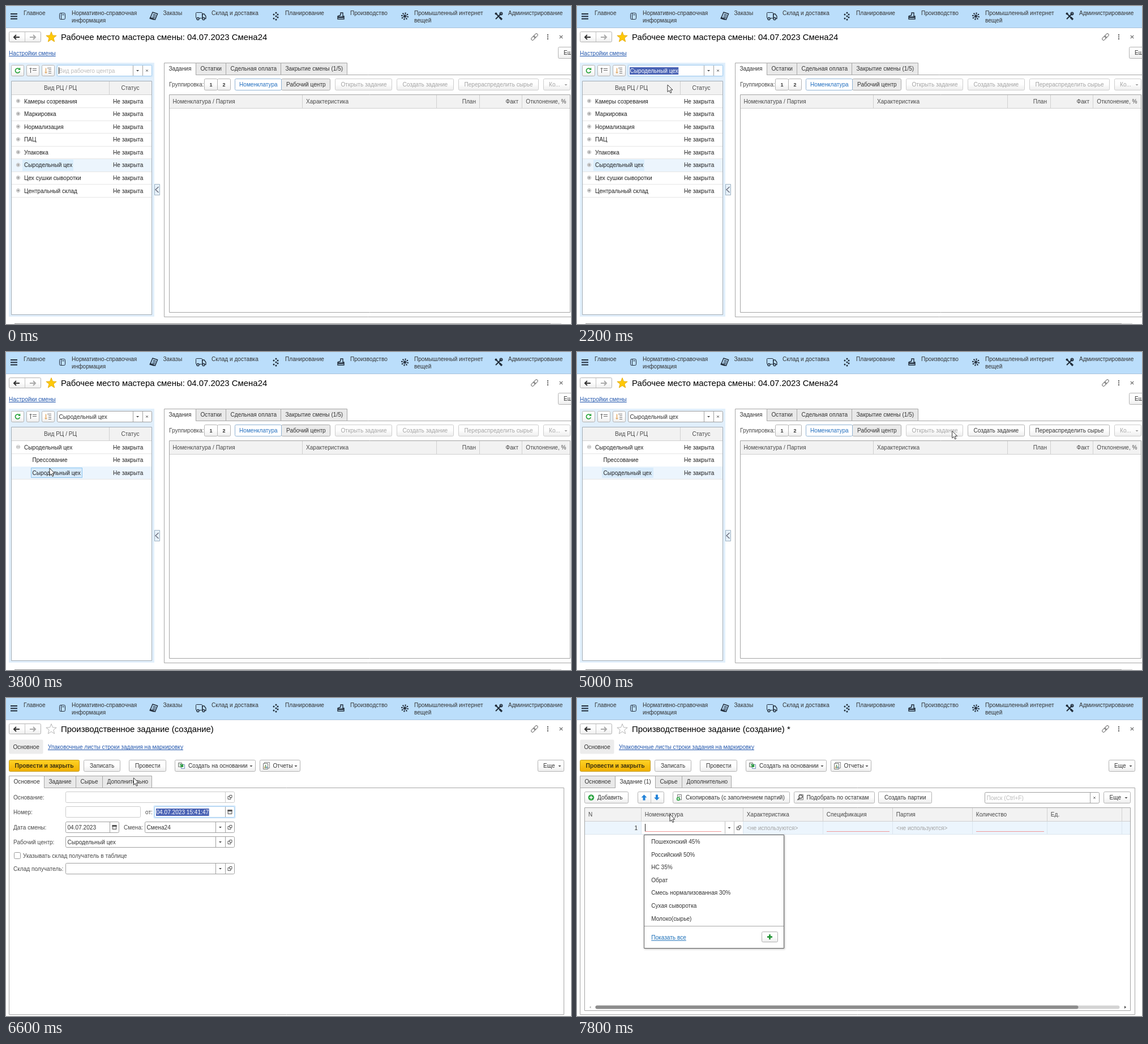
An HTML page with a canvas for the animation above (8 s loop, 998 by 561 pixels).

```html
<!DOCTYPE html>
<html lang="ru">
<head>
<meta charset="utf-8">
<title>Рабочее место</title>
<style>
html, body { margin: 0; width: 100%; height: 100%; overflow: hidden; background: #fff; }
canvas { display: block; }
</style>
</head>
<body>
<canvas id="stage" width="998" height="561"></canvas>
<script>
const c = document.getElementById('stage').getContext('2d');
const LOOP = 8000, STEP = 200, ROW = 22.57, SIZE = 10.1;
const INK = '#333', GREY = '#a3a3a3', EDGE = '#a6a6a6', LINK = '#2458ae', PALE = '#ecf5fd';

// Drawing helpers; text is placed by its vertical centre
function text(s, x, y, color = INK, o = {}) {
  const size = o.size || SIZE;
  c.font = `${o.bold ? 'bold ' : ''}${size}px "Liberation Sans", Arial, sans-serif`;
  c.textAlign = o.align || 'left';
  c.fillStyle = color;
  c.fillText(s, x, y + size * 0.36);
  return c.measureText(s).width;
}
function link(s, x, y, color = LINK) {
  rect(x, y + 5, text(s, x, y, color), 1, color);
}
function rect(x, y, w, h, fill) {
  c.fillStyle = fill;
  c.fillRect(x, y, w, h);
}
function box(x, y, x2, y2, fill, edge = EDGE, r = 0) {
  c.beginPath();
  c.roundRect(x + 0.5, y + 0.5, x2 - x - 1, y2 - y - 1, r);
  if (fill) { c.fillStyle = fill; c.fill(); }
  if (edge) { c.strokeStyle = edge; c.lineWidth = 1; c.stroke(); }
}
const vline = (x, y, y2, color = EDGE) => rect(x, y, 1, y2 - y, color);
const hline = (x, y, x2, color = EDGE) => rect(x, y, x2 - x, 1, color);
function path(points, o = {}) {
  c.beginPath();
  for (let i = 0; i < points.length; i += 2) c.lineTo(points[i], points[i + 1]);
  if (o.close || o.fill) c.closePath();
  if (o.fill) { c.fillStyle = o.fill; c.fill(); }
  if (o.line) { c.strokeStyle = o.line; c.lineWidth = o.w || 1; c.stroke(); }
}
function disc(x, y, r, fill, line, w = 1) {
  c.beginPath();
  c.arc(x, y, r, 0, 7);
  if (fill) { c.fillStyle = fill; c.fill(); }
  if (line) { c.strokeStyle = line; c.lineWidth = w; c.stroke(); }
}
function at(x, y, turn, draw) {
  c.save();
  c.translate(x, y);
  c.rotate(turn);
  draw();
  c.restore();
}
function plus(x, y, r, w, color) {
  rect(x - r, y - w / 2, r * 2, w, color);
  rect(x - w / 2, y - r, w, r * 2, color);
}
function cross(x, y, r, color, w = 1.2) {
  path([x - r, y - r, x + r, y + r], { line: color, w });
  path([x + r, y - r, x - r, y + r], { line: color, w });
}
const drop = (x, y, color = '#444') => path([x - 2.5, y - 1, x + 2.5, y - 1, x, y + 1.6], { fill: color });

// Interface parts
function face(x, y, x2, y2, edge = '#b3b3b3') {
  const g = c.createLinearGradient(0, y, 0, y2);
  g.addColorStop(0, '#fff');
  g.addColorStop(0.5, '#fdfdfd');
  g.addColorStop(1, '#ececec');
  box(x, y, x2, y2, g, edge, 2);
}
function button(x, y, x2, label, lx, color = INK, edge) {
  face(x, y, x2, y + 21, edge);
  text(label, lx, y + 10.5, color);
}
function arrow(x, y, turn, color, len = 5, head = 4, w = 2) {
  at(x, y, turn, () => {
    path([-len, 0, len - 1, 0], { line: color, w });
    path([len - head, -head, len, 0, len - head, head], { line: color, w });
  });
}
function tabs(list, y, y2, active) {
  list.forEach(([label, x, x2], i) => {
    const on = i === active;
    box(x, y, x2 + 1, y2 + 1, on ? '#fff' : '#e9e9e9', EDGE);
    if (on) rect(x + 1, y2, x2 - x - 1, 2, '#fff');
    text(label, x + 8.5, (y + y2) / 2);
  });
}
function openIcon(x, y) {
  box(x - 4, y - 2, x + 2, y + 4, null, '#555');
  box(x - 1, y - 4, x + 4, y + 1, '#fff', '#555');
}
function calendar(x, y) {
  box(x - 4, y - 4, x + 4, y + 4, '#fff', '#555');
  rect(x - 4, y - 4, 8, 3, '#555');
  for (let i = 0; i < 4; i++) rect(x - 2 + (i % 2) * 3, y + (i >> 1) * 2 - 0.5, 1, 1, '#555');
}
function field(x, y, x2, value, o = {}) {
  if (o.focus) box(x - 2, y - 2, x2 + 2, y + 22, '#d3e8fa', null, 2);
  box(x, y, x2, y + 20, '#fff', o.focus ? '#a3cdf0' : o.pale ? '#cbcbcb' : '#a0a0a0', 2);
  const marks = o.marks || '';
  [...marks].forEach((m, i) => {
    const left = x2 - 17 * (marks.length - i), mid = left + 8.5;
    vline(left, y + 1, y + 19, o.pale ? '#cbcbcb' : '#a0a0a0');
    if (m === 'v') drop(mid, y + 10);
    if (m === 'o') openIcon(mid, y + 10);
    if (m === 'c') calendar(mid, y + 10);
    if (m === 'x') cross(mid - 0.5, y + 10, 1.8, '#666', 1);
  });
  if (o.selected) {
    c.font = `${SIZE}px "Liberation Sans", Arial, sans-serif`;
    rect(x + 3, y + 4, c.measureText(value).width + 1, 13, '#4a63b5');
  }
  text(value, x + 3.5, y + 10.3, o.selected ? '#fff' : o.hint ? '#bcbcbc' : INK);
  if (o.caret) vline(x + 3, y + 4, y + 16, '#222');
}
function popup(x, y, items) {
  c.save();
  c.shadowColor = 'rgba(0,0,0,.3)';
  c.shadowBlur = 3;
  c.shadowOffsetX = c.shadowOffsetY = 1;
  rect(x, y, 248, 201, '#fff');
  c.restore();
  box(x, y, x + 248, y + 201, '#fff', '#606060');
  items.forEach((s, i) => text(s, x + 13.2, y + 12.5 + i * ROW));
  hline(x + 1, y + 161, x + 247, '#a8a8a8');
  link('Показать все', x + 13.2, y + 181.3, '#1b6fb8');
  face(x + 208, y + 171, x + 237, y + 190);
  plus(x + 222.5, y + 180.5, 4.5, 2.6, '#1d9130');
}
function star(x, y, filled) {
  const p = [];
  for (let i = 0; i < 10; i++) {
    const a = i * Math.PI / 5 - Math.PI / 2, r = i % 2 ? 4.1 : 9.6;
    p.push(x + r * Math.cos(a), y + 0.7 + r * Math.sin(a));
  }
  path(p, filled ? { fill: '#ffc907', line: '#e5ae12' } : { close: 1, line: '#b5b5b5' });
}

function menuIcons() {
  const d = '#222d3a';
  for (let i = 0; i < 3; i++) rect(8, 13 + i * 4.3, 12, 2, d);
  box(94, 12, 105, 24, null, d, 2);
  vline(97, 12, 24, d);
  rect(99, 15, 4, 1, d);
  at(261, 18, 0.3, () => {
    path([-4, -6, 5, -6, 4, 5, -5, 5], { close: 1, line: d, w: 1.5 });
    for (let i = 0; i < 3; i++) rect(-2, -3.5 + i * 2.5, 5, 1.2, d);
    rect(-6, 3.5, 8, 3, d);
  });
  box(335, 11, 347, 22, null, d, 1);
  path([347, 14, 350, 14, 353, 18, 353, 22, 347, 22], { close: 1, line: d, w: 1.3 });
  for (const x of [339, 349]) disc(x, 22.5, 2, '#bbdefb', d, 1.4);
  [[473, 15], [477, 12], [477, 18], [473, 22], [480, 15], [480, 20], [477, 24]].forEach(([x, y]) => disc(x, y, 1.5, d));
  path([586, 23, 586, 18, 591, 16, 591, 12, 595, 12, 595, 18, 597, 18, 597, 23], { close: 1, line: d, w: 1.4 });
  rect(586, 18.5, 11, 2.5, d);
  for (let i = 0; i < 8; i++) {
    const a = i * Math.PI / 4 + 0.2, x = 704.5 + 5.5 * Math.cos(a), y = 18 + 5.5 * Math.sin(a);
    path([704.5, 18, x, y], { line: d });
    disc(x, y, 1.2, d);
  }
  disc(704.5, 18, 2, d);
  cross(870, 18, 5, d, 2);
  disc(865.5, 13.5, 2, d);
  disc(874.5, 13.5, 2.2, null, d, 1.6);
  path([872, 20, 876, 24], { line: d, w: 3.2 });
}
function chrome(title, starred) {
  rect(0, 0, 998, 561, '#fff');
  rect(0, 0, 998, 38, '#bbdefb');
  hline(0, 38, 998, '#a9c3da');
  menuIcons();
  [['Главное', 31], ['Нормативно-справочная', 116, 'информация'], ['Заказы', 277.5],
   ['Склад и доставка', 363], ['Планирование', 493], ['Производство', 608],
   ['Промышленный интернет', 721, 'вещей'], ['Администрирование', 887]].forEach(([s, x, s2]) => {
    text(s, x, 12.5);
    if (s2) text(s2, x, 25);
  });
  face(5, 45, 62, 64);
  vline(33, 46, 63, '#c4c4c4');
  arrow(19, 55, Math.PI, '#333');
  arrow(47, 55, 0, '#aaa');
  star(80, 54.5, starred);
  text(title, 97, 55, '#000', { size: 14.93 });
  for (const k of [-1, 1]) at(933.5 + k * 2.2, 54.5 - k * 2.2, -Math.PI / 4, () => box(-4.5, -2.8, 4.5, 2.8, null, '#666', 2));
  for (let i = 0; i < 3; i++) rect(956, 50 + i * 3.5, 2, 2, '#555');
  cross(980.5, 54.5, 2.7, '#666');
}

const CENTRES = ['Камеры созревания', 'Маркировка', 'Нормализация', 'ПАЦ', 'Упаковка', 'Сыродельный цех', 'Цех сушки сыворотки', 'Центральный склад'];
const SHOP = CENTRES[5];

function treeTools() {
  for (const x of [9, 36, 63]) face(x, 104, x + 23, 124);
  c.beginPath();
  c.arc(20.5, 114, 4, 0.3, 5.3);
  c.strokeStyle = '#27a33a';
  c.lineWidth = 1.7;
  c.stroke();
  path([21, 112.5, 25.5, 113, 25, 108.5], { fill: '#27a33a' });
  arrow(43.5, 113.5, -Math.PI / 2, '#555', 4.5, 2, 1);
  arrow(70.5, 114, Math.PI / 2, '#d98a29', 4.5, 2, 1);
  for (let i = 0; i < 2; i++) rect(47, 110 + i * 3, 7, 1, '#666');
  for (let i = 0; i < 4; i++) rect(i ? 75 : 73, 109 + i * 3, i ? 5 : 7, 1, '#777');
}
function tree(t) {
  const filtered = t >= 2400, open = t >= 3200, child = t >= 3600;
  const rows = !filtered ? CENTRES : open ? [SHOP, 'Прессование', SHOP] : [SHOP];
  const chosen = !filtered ? 5 : child ? 2 : 0;
  rect(5, 100, 257, 448, '#e1effb');
  treeTools();
  const filled = t >= 2200;
  field(90, 104, 258, filled ? SHOP : 'Вид рабочего центра',
    { marks: 'vx', hint: !filled, caret: !filled, selected: filled && t < 3000, focus: t < 3000 });

  box(9, 132, 258, 545, '#fff', '#a3adb6');
  rect(10, 133, 247, 24, '#f2f2f2');
  vline(182, 133, 157, '#d0d0d0');
  hline(10, 156, 257, '#d0d0d0');
  text('Вид РЦ / РЦ', 96, 144, '#4a4a4a', { align: 'center' });
  text('Статус', 219.5, 144, '#4a4a4a', { align: 'center' });
  rows.forEach((name, i) => {
    const y = 168 + i * ROW, top = Math.round(y - 11), inner = open && i > 0;
    if (i === chosen) {
      rect(10, top, 247, 22, PALE);
      if (inner) box(44, top + 2, 135, top + 20, '#d8ebfb', t < 4200 ? '#8cc6f0' : '#d8ebfb');
      else rect(29, top + 1, 90, 20, '#d9edfc');
    }
    hline(10, top + 22, 257, '#e6e6e6');
    if (!inner) {
      disc(21.5, y - 0.5, 3, '#fff', '#aaa');
      rect(19.5, y - 1, 4, 1, '#777');
      if (!open) rect(21, y - 2.5, 1, 4, '#777');
    }
    text(name, inner ? 46.5 : 32, y, '#222');
    text('Не закрыта', 189, y, '#222');
  });
  path([262.5, 314.5, 271.5, 314.5, 271.5, 333.5, 262.5, 333.5], { fill: '#e6f1fa', line: '#9fb2c2' });
  path([269.5, 319, 264, 324, 269.5, 329], { line: '#667', w: 1.3 });
}

function workplace(t) {
  chrome('Рабочее место мастера смены: 04.07.2023 Смена24', true);
  link('Настройки смены', 5, 83);
  button(975, 72, 1020, 'Еще', 985);
  tree(t);
  box(279, 121, 1000, 549, '#fff');
  tabs([['Задания', 279, 335], ['Остатки', 335, 388], ['Сдельная оплата', 388, 485], ['Закрытие смены (1/5)', 485, 602]], 100, 121, 0);
  text('Группировка:', 288, 138.5, '#4a4a4a');
  for (const [s, x] of [['1', 350], ['2', 373]]) {
    face(x, 128, x + 24, 149);
    text(s, x + 12, 138.5, INK, { bold: 1, size: 9, align: 'center' });
  }
  box(486, 128, 573, 149, '#ebebeb', '#a9a9a9', 2);
  box(404, 128, 487, 149, '#fff', '#8fb2d3', 2);
  text('Номенклатура', 412, 138.5, '#2470c0');
  text('Рабочий центр', 495, 138.5);
  const live = t >= 4200 ? INK : GREY, edge = t >= 4200 ? '#b3b3b3' : '#cdcdcd';
  button(581, 128, 682, 'Открыть задание', 591.5, GREY, '#cdcdcd');
  button(690, 128, 791, 'Создать задание', 700.5, live, edge);
  button(799, 128, 941, 'Перераспределить сырье', 809.5, live, edge);
  button(949, 128, 997, 'Ко...', 959, GREY, '#cdcdcd');
  drop(989, 139, '#999');

  box(288, 156, 997, 541, '#fff', '#a3a3a3');
  rect(289, 157, 707, 23, '#f2f2f2');
  hline(289, 180, 996, '#d0d0d0');
  for (const x of [523, 760, 836, 911]) vline(x, 157, 180, '#d0d0d0');
  text('Номенклатура / Партия', 294.5, 168, '#4a4a4a');
  text('Характеристика', 530, 168, '#4a4a4a');
  for (const [s, x] of [['План', 830], ['Факт', 905], ['Отклонение, %', 989.5]]) text(s, x, 168, '#4a4a4a', { align: 'right' });
  hline(15, 560, 981, '#8c8c8c');
  hline(962, 560, 981, '#c9c9c9');
  if (t >= 1600 && t < 2200) popup(95, 126, [SHOP, 'Нормализация', CENTRES[6], 'ПАЦ', CENTRES[0], 'Упаковка', 'Маркировка']);
}

function mainTab(t) {
  [['Основание:', 175], ['Номер:', 201.5], ['Дата смены:', 228], ['Рабочий центр:', 254.5], ['Склад получатель:', 301]]
    .forEach(([s, y]) => text(s, 13, y, '#4a4a4a'));
  field(105, 165, 404, '', { marks: 'o', pale: 1 });
  field(105, 191, 238, '', { pale: 1 });
  text('от:', 246, 201.5, '#4a4a4a');
  field(262, 191, 404, '04.07.2023 15:41:47', { marks: 'c', focus: t >= 5600, selected: t >= 5600 });
  field(105, 218, 200, '04.07.2023', { marks: 'c' });
  text('Смена:', 208, 228, '#4a4a4a');
  field(245, 218, 404, 'Смена24', { marks: 'vo' });
  field(105, 244, 404, SHOP, { marks: 'vo' });
  box(14, 272, 26, 284, '#fff', '#999', 2);
  text('Указывать склад получатель в таблице', 30, 278, '#4a4a4a');
  field(105, 291, 404, '', { marks: 'vo' });
}

function sheet(x, y) {
  box(x - 4, y - 5, x + 4, y + 5, '#fff', '#777');
  rect(x - 2, y - 2, 4, 1, '#888');
}
function taskTab(t) {
  const added = t >= 7400;
  button(13, 165, 91, 'Добавить', 36);
  disc(25, 175.5, 5.3, '#2fa544');
  plus(25, 175.5, 3, 1.6, '#fff');
  face(107, 165, 154, 186);
  vline(130, 166, 185, '#c4c4c4');
  const tint = added ? '#2483d8' : '#b4b4b4';
  for (const [x, turn] of [[118.5, 0], [141, Math.PI]])
    at(x, 175.5, turn, () => path([0, -5, 5, 0, 2, 0, 2, 5, -2, 5, -2, 0, -5, 0], { fill: tint }));
  button(169, 165, 376, 'Скопировать (с заполнением партий)', 192);
  sheet(181, 175);
  disc(179, 178, 3.2, '#2fa544');
  plus(179, 178, 2, 1, '#fff');
  button(383, 165, 526, 'Подобрать по остаткам', 405.5);
  sheet(396, 175);
  disc(395, 174, 3, '#fff', '#555', 1.4);
  path([393, 176.5, 389.5, 180], { line: '#555', w: 2 });
  button(532, 165, 627, 'Создать партии', 543);
  field(720, 166, 923, 'Поиск (Ctrl+F)', { marks: 'x', hint: 1 });
  button(930, 165, 978, 'Еще', 940.5);
  drop(970, 176);

  box(13, 193, 978, 552, '#fff', '#a3a3a3');
  rect(14, 194, 963, 23, '#f2f2f2');
  hline(14, 217, 977, '#d0d0d0');
  const cols = [113, 293, 434, 557, 698, 830, 962];
  cols.forEach(x => vline(x, 194, 217, '#d0d0d0'));
  ['N', 'Номенклатура', 'Характеристика', 'Спецификация', 'Партия', 'Количество', 'Ед.']
    .forEach((s, i) => text(s, i ? cols[i - 1] + 6.8 : 20, 205, '#4a4a4a'));
  if (added) {
    rect(14, 218, 963, 22, PALE);
    hline(14, 240, 977, '#dde6ee');
    cols.forEach(x => vline(x, 218, 240, '#dbe5ee'));
    rect(114, 218, 179, 22, '#fff');
    text('1', 107, 229, INK, { align: 'right' });
    vline(261, 218, 240, '#bbb');
    vline(277, 218, 240, '#bbb');
    drop(269, 229);
    openIcon(286, 229);
    for (const [x, x2] of [[120, 255], [441, 552], [705, 825]]) hline(x, 235, x2, '#f09a9a');
    vline(120, 222, 235, '#222');
    for (const x of [300, 564]) text('<не используются>', x, 229, GREY);
  } else if (t >= 7000) {
    hline(14, 217, 977, '#555');
    vline(14, 217, 241, '#555');
    hline(14, 240, 977, '#d63a3a');
  }
  box(32, 542, 959, 549, '#d4d4d4', null, 3);
  box(32, 542, 886, 549, '#8c8c8c', null, 3);
  path([24.5, 543.5, 24.5, 547.5, 22, 545.5], { fill: '#aaa' });
  path([967, 543, 967, 548, 970, 545.5], { fill: '#444' });
  if (t >= 7800) popup(118, 241, ['Пошехонский 45%', 'Российский 50%', 'НС 35%', 'Обрат', 'Смесь нормализованная 30%', 'Сухая сыворотка', 'Молоко(сырье)']);
}

function order(t) {
  const task = t >= 6800, added = t >= 7400, grow = added ? 15 : 0;
  chrome('Производственное задание (создание)' + (added ? ' *' : ''), false);
  box(5, 73, 66, 99, '#ececec', null, 2);
  text('Основное', 12.5, 86);
  link('Упаковочные листы строки задания на маркировку', 74, 86);
  const g = c.createLinearGradient(0, 109, 0, 130);
  g.addColorStop(0, '#ffd326');
  g.addColorStop(1, '#f0b000');
  box(5, 109, 130, 130, g, '#c39a1c', 2);
  text('Провести и закрыть', 67.5, 119.5, '#3d3310', { bold: 1, size: 10.4, align: 'center' });
  button(137, 109, 202, 'Записать', 148);
  button(217, 109, 283, 'Провести', 228);
  button(298, 109, 441, 'Создать на основании', 322);
  drop(433, 120);
  box(304, 114, 311, 122, '#d7e9d9', '#777');
  box(309, 117, 316, 125, '#fff', '#6f8fb5');
  arrow(310, 119, 0.7, '#2a9a3c', 3, 3);
  button(448, 109, 520, 'Отчеты', 471.5);
  drop(512, 120);
  box(456, 113, 466, 124, '#fff', '#888');
  box(454, 115, 463, 126, '#fff', '#777');
  for (let i = 0; i < 3; i++) rect(456 + i * 2, 121 - i % 2 * 3, 1.3, 3 + i % 2 * 3, ['#c84', '#484', '#48b'][i]);
  button(939, 109, 986, 'Еще', 949);
  drop(978, 120);
  box(5, 158, 986, 559, '#fff');
  tabs([['Основное', 5, 67], ['Задание' + (added ? ' (1)' : ''), 67, 123 + grow], ['Сырье', 123 + grow, 170 + grow],
    ['Дополнительно', 170 + grow, 257 + grow]], 137, 158, task ? 1 : 0);
  (task ? taskTab : mainTab)(t);
}

// Pointer route: time, x, y, shape
const ROUTE = [
  [800, 124, 122, 'beam'], [1000, 185, 120, 'beam'], [1200, 232, 118, 'arrow'], [1400, 232, 118, 'arrow'],
  [1600, 216, 124, 'beam'], [1800, 190, 133, 'arrow'], [2000, 160, 139, 'arrow'], [2200, 160, 139, 'arrow'],
  [2600, 75, 172, 'arrow'], [2800, 50, 179, 'busy'], [3000, 22, 167, 'arrow'], [3200, 22, 167, 'arrow'],
  [3600, 70, 203, 'arrow'], [3800, 77, 205, 'arrow'], [4000, 77, 205, 'arrow'], [4600, 430, 130, 'arrow'],
  [5200, 779, 144, 'arrow'], [5800, 779, 144, 'arrow'], [6300, 430, 127, 'arrow'], [6800, 89, 150, 'arrow'],
  [7000, 89, 150, 'arrow'], [7200, 55, 172, 'arrow'], [7400, 55, 172, 'arrow'], [7800, 164, 205, 'arrow'], [8000, 164, 205, 'arrow']
];
const SHAPES = {
  arrow: (x, y) => path([x, y, x, y + 12.5, x + 3, y + 10, x + 5, y + 14.5, x + 7, y + 13.5, x + 5, y + 9, x + 9, y + 9], { fill: '#fff', line: '#333' }),
  beam(x, y) {
    rect(x - 0.7, y - 6, 1.5, 13, '#222');
    for (const dy of [-6.5, 6]) rect(x - 3, y + dy, 6, 1.2, '#222');
  },
  busy(x, y) {
    disc(x, y, 6, null, '#1c7fd2', 4.4);
    c.beginPath();
    c.arc(x, y, 6, 3.4, 5.2);
    c.strokeStyle = '#78bdf2';
    c.lineWidth = 3;
    c.stroke();
  }
};
function pointer(t) {
  const i = ROUTE.findLastIndex(k => k[0] <= t);
  if (i < 0) return;
  const a = ROUTE[i], b = ROUTE[i + 1] || a;
  const f = b === a ? 0 : (t - a[0]) / (b[0] - a[0]);
  SHAPES[a[3]](a[1] + (b[1] - a[1]) * f, a[2] + (b[2] - a[2]) * f);
}

function frame(now) {
  const t = Math.floor(now % LOOP / STEP) * STEP;
  (t < 5400 ? workplace : order)(t);
  pointer(t);
  requestAnimationFrame(frame);
}
frame(0);
</script>
</body>
</html>
```
